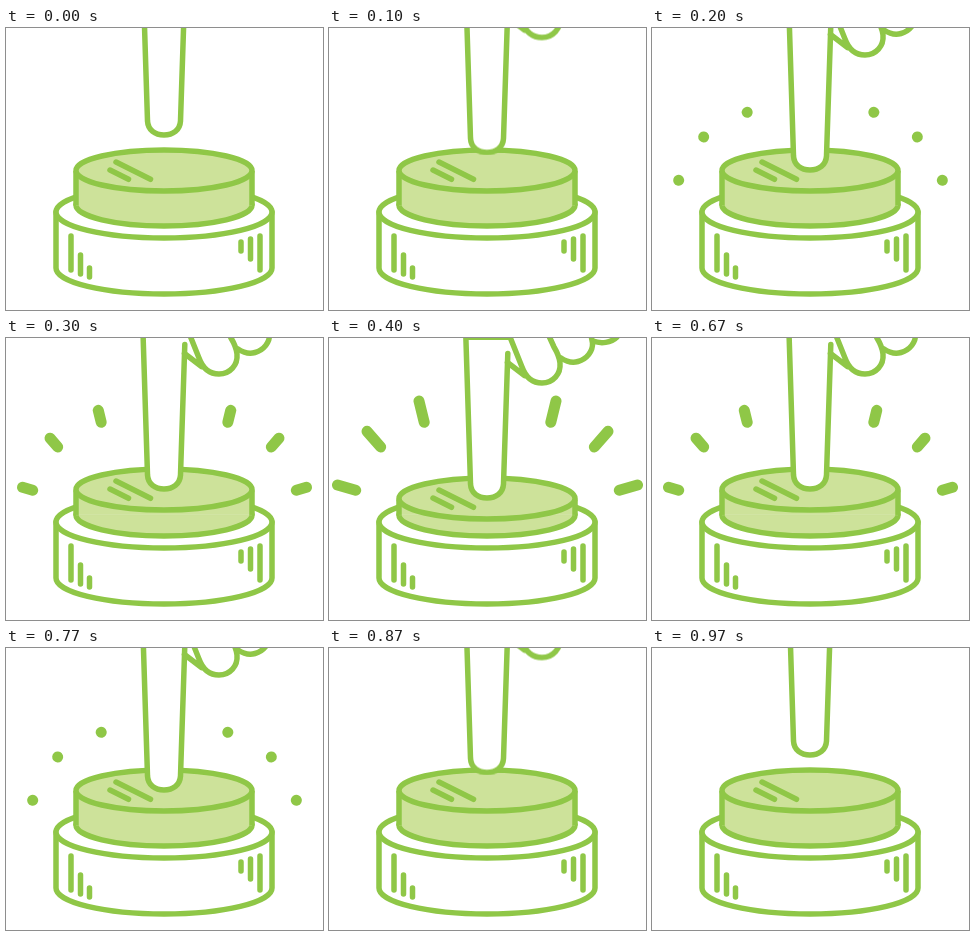
These frames come from a looping animation (317 px wide and 282 px high, 1070 ms). An HTML page:

```html
<!DOCTYPE html>
<html lang="en">
<head>
<meta charset="utf-8">
<title>Button press</title>
<style>
  html, body { margin: 0; width: 100%; height: 100%; overflow: hidden; background: #fff; }
  svg { display: block; width: 317px; height: 282px; }
  .line { fill: none; stroke: #8fc747; stroke-width: 5.5; stroke-linecap: round; stroke-linejoin: round; }
  .white { fill: #fff; }
  .tint { fill: #cde29a; }
  .side { stroke-linecap: butt; transform-origin: 0 177px; }
  .rays { stroke-width: 11; stroke-dasharray: .001 2; }
  .hand, .cap, .side, .rays { animation: 1070ms step-end infinite; }
  .hand { animation-name: hand; }
  .cap { animation-name: cap; }
  .side { animation-name: side; }
  .rays { animation-name: rays; }

  @keyframes hand {
    0%, 90.65% { transform: translateY(-53px); }
    9.34%, 81.3% { transform: translateY(-35.5px); }
    18.69%, 71.96% { transform: translateY(-18px); }
    28.03%, 62.61% { transform: translateY(-9px); }
    37.38% { transform: none; }
  }
  @keyframes cap {
    0%, 71.96% { transform: none; }
    28.03%, 62.61% { transform: translateY(9px); }
    37.38% { transform: translateY(18px); }
  }
  @keyframes side {
    0%, 71.96% { transform: none; }
    28.03%, 62.61% { transform: scaleY(.735); }
    37.38% { transform: scaleY(.47); }
  }
  @keyframes rays {
    0%, 81.3% { visibility: hidden; }
    18.69%, 71.96% { visibility: visible; stroke-dasharray: .001 2; }
    28.03%, 62.61% { visibility: visible; stroke-dasharray: .56 2; }
    37.38% { visibility: visible; stroke-dasharray: 1 2; }
  }
</style>
</head>
<body>
<svg viewBox="0 0 317 282">
  <defs>
    <g id="burst">
      <path pathLength="1" d="M95.2 84.3L90 63"/>
      <path pathLength="1" d="M51.7 109L38 93.3"/>
      <path pathLength="1" d="M26.7 152.3L8.5 147"/>
    </g>
  </defs>

  <g class="line">
    <path class="white" d="M50 184V240A108 26 0 0 0 266 240V184"/>
    <ellipse class="white" cx="158" cy="184" rx="108" ry="26"/>
    <path d="M65 208V242M74.5 227V246M83.5 240V249M254 208V242M244.5 211V231M235 214V223"/>
  </g>

  <g class="line">
    <path class="tint" d="M70 177A88 21 0 0 0 246 177"/>
    <g class="side">
      <path class="tint" stroke="none" d="M70 143H246V177.5H70Z"/>
      <path d="M70 143V177.5M246 143V177.5"/>
    </g>
    <g class="cap">
      <ellipse class="tint" cx="158" cy="142.5" rx="88" ry="20.5"/>
      <path d="M110 134L144.5 151.3M104 142L122.5 151.3"/>
    </g>
  </g>

  <g class="line rays">
    <use href="#burst"/>
    <use href="#burst" transform="translate(317) scale(-1 1)"/>
  </g>

  <g class="line hand">
    <path class="white" stroke="none" d="M137 0L141.5 146C142 155 149 160 158 160S174 155 174.5 146L179 15V0Z"/>
    <path d="M136.5 -12L141.5 146C142 155 149 160 158 160S174 155 174.5 146L178.8 15.5M137 -.8H181"/>
    <path d="M178.5 24.5L195.5 37.5M181 -1L193 29C197 40 204 45 213 45C224 45 232 36 231 25C230.5 20 228 14 225 9L220 -2"/>
    <path d="M232 20C238 24 244 25 249 23.5C258 21 264 13 263.5 5L262 -3M264 3C272 6 282 5 288 -1L290 -6"/>
  </g>
</svg>
</body>
</html>
```
